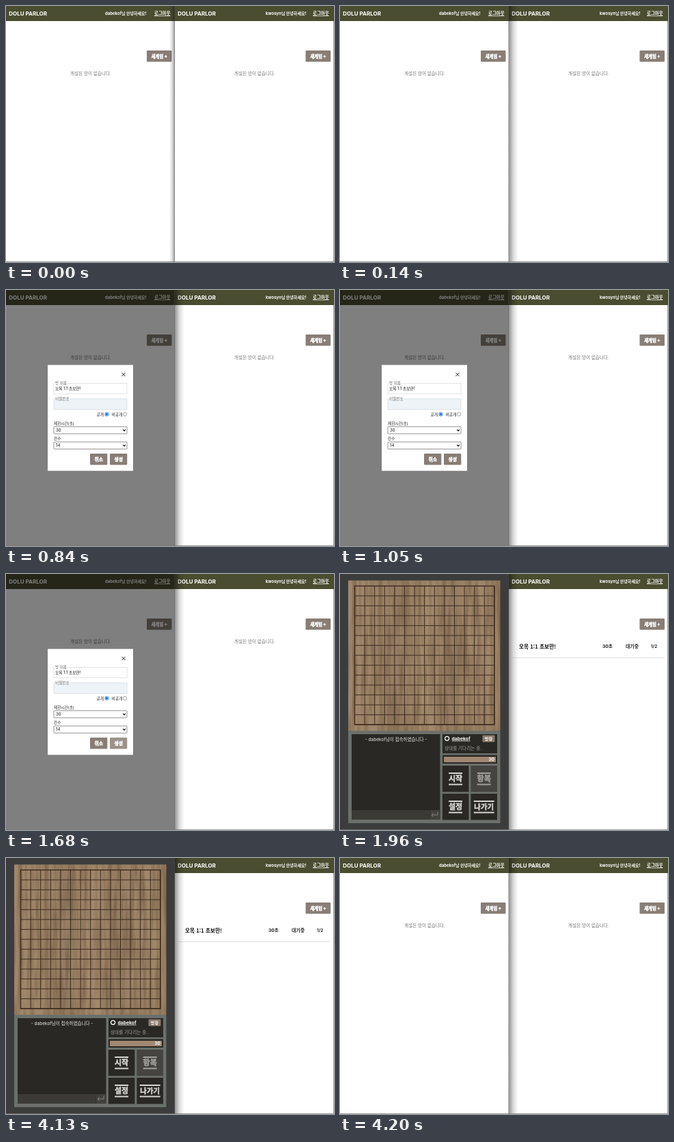
An HTML page for the animation above (5670 ms loop, 480 by 374 pixels).

```html
<!DOCTYPE html>
<html lang="ko">
<head>
<meta charset="utf-8">
<style>
html, body { margin: 0; width: 100%; height: 100%; overflow: hidden; background: #fff; }
svg { display: block; width: 100vw; height: 100vh; }
text { font-family: Inter, "Noto Sans CJK KR", "Noto Sans CJK", "Noto Sans", sans-serif; }
.heavy { font-family: "Noto Sans CJK KR", "Noto Sans CJK", "Noto Sans", sans-serif; stroke-width: .45px; }
</style>
</head>
<body>
<svg id="stage" viewBox="0 0 480 374" lang="ko"></svg>
<script>
const LOOP = 5670;
const SHADOW_SWAP = 70, NEW_HOVER = 490, DIALOG_OPEN = 840;
const CREATE_HOVER = 1540, ROOM_OPEN = 1960, ROOM_CLOSE = 4200;
const BROWN = '#887e76', BROWN_HOVER = '#9b928a';
const HOST = 'dabekof', GUEST = 'kwosyn', ROOM = '오목 1:1 초보만!';

const rect = (x, y, w, h, fill, extra = '') =>
  `<rect x="${x}" y="${y}" width="${w}" height="${h}" fill="${fill}" ${extra}/>`;
const line = (d, color, width = 1, extra = '') =>
  `<path d="${d}" fill="none" stroke="${color}" stroke-width="${width}" ${extra}/>`;
const text = (x, y, str, size, fill = '#fff', weight = 400, extra = '') =>
  `<text x="${x}" y="${y}" font-size="${size}" fill="${fill}" font-weight="${weight}" ${extra}>${str}</text>`;
const MIDDLE = 'text-anchor="middle"', END = 'text-anchor="end"';
const UNDERLINE = 'text-decoration="underline"';
const group = (id, body) => `<g id="${id}">${body}</g>`;

// Thickened lettering for button labels
const label = (x, y, str, size, color) =>
  text(x, y, str, size, color, 900, `class="heavy" stroke="${color}" ${MIDDLE}`);

const button = (x, y, w, str, size, id = '') =>
  rect(x, y, w, 16.5, BROWN, `rx="1.3" ${id && `id="${id}"`}`) +
  label(x + w / 2, y + 10.6, str, size, '#fff');

// Positions that differ between the two windows are passed in
function lobby(x, w, user, userX, logoutX, buttonX, id) {
  return rect(x, 0, w, 374, '#fff') + rect(x, 0, w, 22, '#4a4d30') +
    text(x + 4.3, 14.2, 'DOLU PARLOR', 8, '#fff', 700) +
    text(userX, 13.2, user + '님 안녕하세요!', 6, '#fff', 700) +
    text(logoutX, 13.4, '로그아웃', 6.4, '#fff', 600, UNDERLINE) +
    button(buttonX, 65, 36.5, '새게임 +', 6.3, id);
}

const emptyNote = x => text(x, 101, '개설된 방이 없습니다.', 6.55, '#777');

function roomCard() {
  return rect(252, 92, 223, 31, '#000', 'opacity=".12" rx="2"') +
    rect(252, 91, 223, 31, '#fff', 'rx="2"') +
    text(262, 108.7, ROOM, 7.7, '#111', 700, 'class="heavy"') +
    text(384, 108, '30초', 6.7, '#222', 700) +
    text(418, 108, '대기중', 6.9, '#222', 700) +
    text(455, 108, '1/2', 6.3, '#222', 700);
}

function field(y, name, nameWidth, fill) {
  return rect(70, y, 107, 15.5, fill, 'stroke="#d5d8da" stroke-width=".7"') +
    rect(71, y - 1, nameWidth, 2, '#fff') + text(72, y + 2, name, 5.6, '#666');
}

function select(y, name, value) {
  return text(70, y - 3, name, 5.6, '#222') +
    rect(70, y, 107, 10.3, '#fff', 'stroke="#777" stroke-width=".8" rx=".8"') +
    text(73, y + 7.3, value, 6, '#111') +
    line(`M171.2 ${y + 4.2}l1.8 1.9 1.8-1.9`, '#111', 1.2);
}

function dialog() {
  return rect(0, 0, 247, 374, '#000', 'opacity=".5"') +
    rect(61, 109.5, 125, 154.7, '#fff') +
    line('M169.4 120.8l5.2 5.2m0-5.2l-5.2 5.2', '#222', 1) +
    field(136.3, '방 이름', 19, '#fff') + text(72, 146.4, ROOM, 5.7, '#111') +
    field(159, '비밀번호', 22, '#eef3f7') +
    text(132.5, 183.6, '공개', 5.7, '#222') +
    '<circle cx="147.4" cy="181.5" r="2.7" fill="#fff" stroke="#1973e8" stroke-width=".9"/>' +
    '<circle cx="147.4" cy="181.5" r="1.7" fill="#1973e8"/>' +
    text(154.5, 183.6, '비공개', 5.7, '#222') +
    '<circle cx="174" cy="181.5" r="2.7" fill="#fff" stroke="#777" stroke-width=".7"/>' +
    select(199.7, '제한시간(초)', '30') + select(222, '칸수', '14') +
    button(123, 239, 25.3, '취소', 6.8) + button(152, 239, 25.3, '생성', 6.8, 'create');
}

function gameButton(x, y, str, size, disabled) {
  const color = disabled ? '#a09f9b' : '#d6d4d0', cx = x + 19.3;
  const width = str.length * 10;
  return rect(x, y, 38.6, 38.3, disabled ? '#454441' : '#292824') +
    line(`M${cx - width / 2} ${y + 11}h${width}m0 16.5h-${width}`, color, 1.8) +
    label(cx, y + 23, str, size, color);
}

function board() {
  let grid = '';
  for (let i = 0; i < 15; i++)
    grid += `M${21.5 + i * 14.6} 17.5v202.6M21.5 ${17.5 + i * 14.47}h204.4`;
  return rect(12, 9.5, 222.5, 219.5, 'url(#wood)') +
    rect(12, 9.5, 222.5, 219.5, '#000', 'filter="url(#grain)"') +
    line(grid, '#3b2b1e', 1) + rect(21.5, 17.5, 204.4, 202.6, 'none', 'stroke="#3b2b1e" stroke-width="1.4"');
}

function room() {
  return rect(0, 0, 247, 374, '#3c3c3d') + board() +
    rect(12, 229, 222.5, 135, '#6b706b') +
    rect(17, 234, 129.5, 124.5, '#292824') +
    rect(17, 345, 114.5, 13.5, '#3b3a37') + rect(132, 345, 14.5, 13.5, '#42413e') +
    line('M143 347.5v4.5h-9m2.8-2.8l-2.8 2.8 2.8 2.8', '#8c8b87', .9) +
    text(82, 243.7, `- ${HOST}님이 접속하였습니다 -`, 6.5, '#eee', 400, MIDDLE) +
    rect(150, 234, 80, 28, '#292824') +
    '<circle cx="156.6" cy="240.3" r="3" fill="none" stroke="#fff" stroke-width="1.2"/>' +
    text(163.5, 242.7, HOST, 6.8, '#fff', 700, UNDERLINE) +
    rect(208.5, 235.5, 18, 10, '#8b7b6d', 'rx="1"') +
    text(217.5, 242.8, '방장', 6.2, '#fff', 700, MIDDLE) +
    text(153, 256.8, '상대를 기다리는 중..', 6.6, '#a3a29e') +
    rect(150, 264.5, 80, 12.5, '#292824') + rect(152, 267, 76, 8, '#a08772') +
    text(226, 273.4, '30', 6.6, '#fff', 700, END) +
    gameButton(149.8, 280, '시작', 11) + gameButton(191.4, 280, '항복', 11, true) +
    gameButton(149.8, 321, '설정', 11) + gameButton(191.4, 321, '나가기', 10.4);
}

const fade = (id, from, to) => `<linearGradient id="${id}">
  <stop offset="0" stop-opacity="${from}"/><stop offset=".5" stop-opacity="${(from + to) * .32}"/>
  <stop offset="1" stop-opacity="${to}"/></linearGradient>`;
const woodStops = ['#a0876a', '#9f8669', '#957d62', '#a78d6f', '#937b60', '#a1886b', '#9d8467']
  .map((color, i) => `<stop offset="${i / 6}" stop-color="${color}"/>`).join('');

const stage = document.getElementById('stage');
stage.innerHTML = `<defs>
  ${fade('toRight', .42, 0)}${fade('toLeft', 0, .4)}
  <linearGradient id="wood">${woodStops}</linearGradient>
  <filter id="grain" x="0" y="0" width="1" height="1" color-interpolation-filters="sRGB">
    <feTurbulence type="fractalNoise" baseFrequency=".16 .012" numOctaves="3" seed="4"/>
    <feColorMatrix values="0 0 0 0 .28  0 0 0 0 .2  0 0 0 0 .12  .8 0 0 0 -.28"/>
  </filter></defs>` +
  lobby(0, 247, HOST, 145, 217, 206, 'newGame') + emptyNote(94) +
  group('dialog', dialog()) + group('room', room()) +
  lobby(247, 233, GUEST, 380, 449, 438.5, '') +
  group('note', emptyNote(334)) + group('card', roomCard()) +
  rect(239, 0, 8, 374, 'url(#toLeft)', 'id="leftShadow"') +
  rect(247, 0, 14, 374, 'url(#toRight)', 'id="rightShadow"') +
  line('M246.7 0V374', '#555', .6, 'opacity=".7"') +
  line('M0 373.6H480M479.6 22V374', '#777', .8);

const el = id => document.getElementById(id);
const show = (id, visible) => el(id).setAttribute('visibility', visible ? 'visible' : 'hidden');
const mix = k => `color-mix(in srgb, ${BROWN_HOVER} ${k * 100}%, ${BROWN})`;

function draw(now) {
  const t = now % LOOP;
  const between = (a, b) => t >= a && t < b;
  const inRoom = between(ROOM_OPEN, ROOM_CLOSE);
  show('leftShadow', t < SHADOW_SWAP);
  show('rightShadow', t >= SHADOW_SWAP);
  show('dialog', between(DIALOG_OPEN, ROOM_OPEN));
  show('room', inRoom);
  show('card', inRoom);
  show('note', !inRoom);
  el('newGame').style.fill = between(NEW_HOVER, DIALOG_OPEN) ? BROWN_HOVER : BROWN;
  const hoverStep = Math.floor((t - CREATE_HOVER) / 70) + 1;
  el('create').style.fill = mix(Math.max(0, Math.min(1, hoverStep / 3)));
  requestAnimationFrame(() => draw(performance.now()));
}
draw(performance.now());
</script>
</body>
</html>
```
